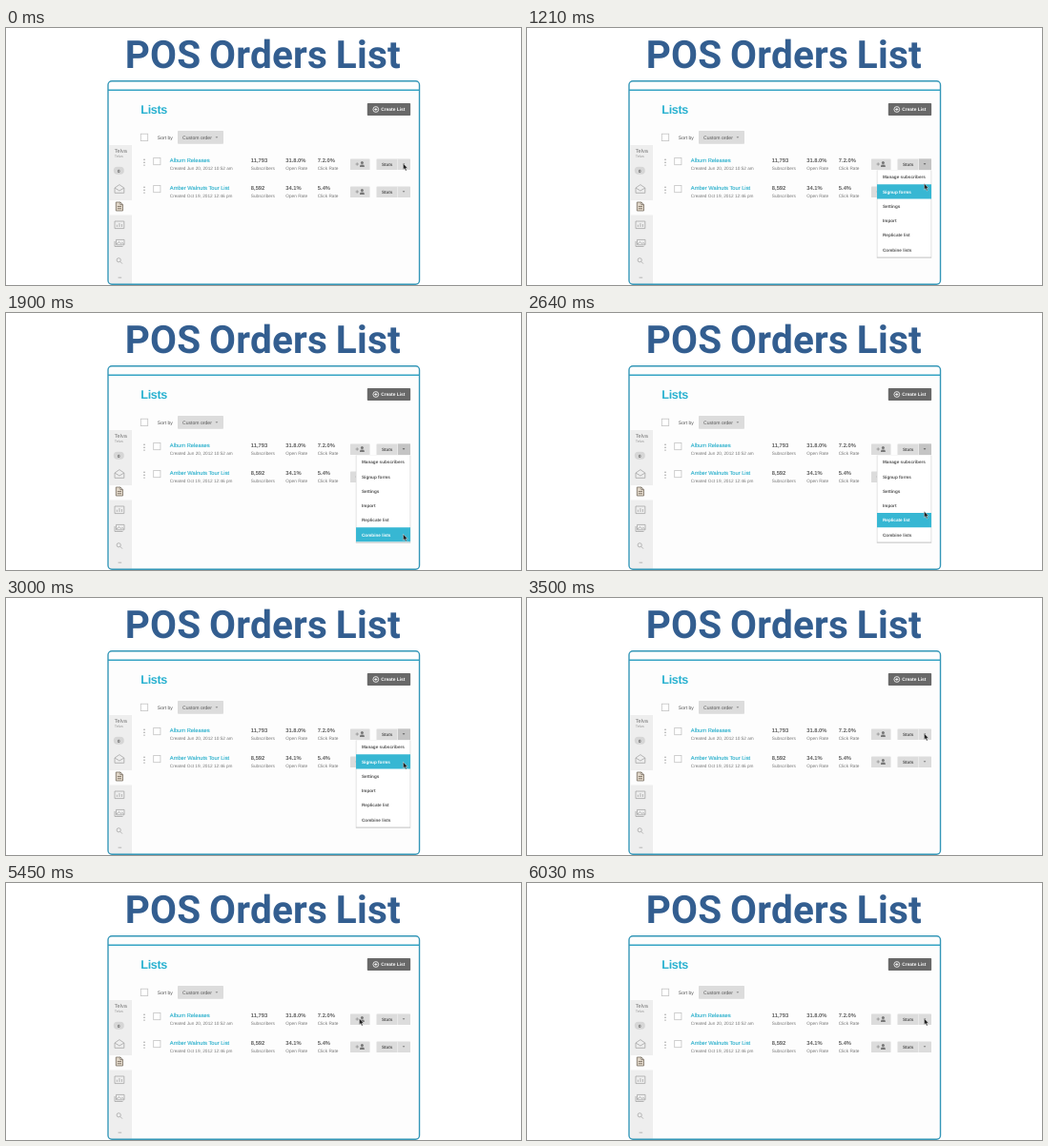
These frames come from a looping animation (540 px wide and 270 px high, 6.36 s). An HTML page:

```html
<!DOCTYPE html>
<html lang="en">
<head>
<meta charset="utf-8">
<title>POS Orders List</title>
<style>
  html, body { margin: 0; width: 100%; height: 100%; overflow: hidden; background: #fff; }
  svg { display: block; width: 100vw; height: 100vh; }
  text { font-family: "Liberation Sans", Arial, sans-serif; font-size: 4.75px; fill: #777; text-rendering: geometricPrecision; }
  .title { font: 700 40.5px Roboto, sans-serif; letter-spacing: .2px; word-spacing: -1.5px; fill: #335e90; text-anchor: middle; }
  .bold { font-weight: 700; fill: #555; }
  .link { font-size: 5.75px; fill: #2bb0cc; stroke: #2bb0cc; stroke-width: .12; }
  .number { font-size: 5.8px; font-weight: 700; fill: #606060; }
  .items text { font-size: 4.65px; font-weight: 700; fill: inherit; }
  .button { fill: #dcdcdc; }
  .box { fill: #fff; stroke: #c4c4c4; stroke-width: .8; }
  .icon { fill: none; stroke: #a6a6a6; stroke-width: .8; }

  /* One loop is 6360 ms; the small lead keeps steps ahead of their tick. */
  .menu, .form, .cursor, .hover { animation: 6360ms step-end -4ms infinite; }
  .menu { animation-name: menu; }
  .form { animation-name: form; }
  .cursor { animation-name: cursor; }
  .hover { animation-name: hover; }

  @keyframes menu {
    0%, 55.0314% { visibility: hidden; }
    11.0063% { visibility: visible; }
    100% { visibility: hidden; }
  }
  @keyframes form {
    0%, 85.6918% { visibility: hidden; }
    65.2516% { visibility: visible; }
    100% { visibility: hidden; }
  }
  @keyframes cursor {
    0% { transform: none; }
    15.7233% { transform: translate(0, 0); animation-timing-function: steps(30); }
    29.8742% { transform: translate(0, 90px); }
    37.7358% { transform: translate(0, 90px); animation-timing-function: steps(30); }
    51.8868% { transform: translate(0, 0); }
    57.2327% { transform: translate(0, 0); animation-timing-function: steps(16); }
    64.7799% { transform: translate(-46px, 0); }
    87.2642% { transform: translate(-46px, 0); animation-timing-function: steps(16); }
    94.8113%, 100% { transform: translate(0, 0); }
  }
  @keyframes hover {
    0% { transform: translateY(-15.25px); }
    14.3082% { transform: translateY(-15.25px); animation-timing-function: steps(6); }
    28.4591% { transform: translateY(76.25px); }
    37.2642% { transform: translateY(76.25px); animation-timing-function: steps(6); }
    51.4151%, 100% { transform: translateY(-15.25px); }
  }
</style>
</head>
<body>
<svg viewBox="0 0 540 270">
  <defs>
    <clipPath id="window"><rect x="107" y="55.8" width="326.5" height="213.5" rx="4"/></clipPath>
    <clipPath id="hoverRow"><rect class="hover" x="367" y="149" width="57" height="15.25"/></clipPath>
    <g id="rowTools">
      <g fill="#8c8c8c"><circle cx="145" cy="138.3" r=".7"/><circle cx="145" cy="141.2" r=".7"/><circle cx="145" cy="144.1" r=".7"/></g>
      <rect class="box" x="154.7" y="136.5" width="7.2" height="7.2"/>
      <rect class="button" x="361" y="137.5" width="20.5" height="11.5" rx=".6"/>
      <path d="M366.5 143h3.4M368.2 141.3v3.4" stroke="#888" stroke-width=".7"/>
      <path d="M371 146v-1q0-1.4 2.4-1.4t2.4 1.4v1z" fill="#777"/>
      <circle cx="373.4" cy="141.5" r="1.5" fill="#777"/>
      <rect class="button" x="388.5" y="137.5" width="35.5" height="11.5" rx=".6"/>
      <path d="M410.6 137.5v11.5" stroke="#f2f2f2" stroke-width=".7"/>
      <text class="bold" x="394" y="145" style="font-size:4.6px">Stats</text>
      <path d="M415.6 142.2h2.8l-1.4 1.6z" fill="#777"/>
      <text x="256.8" y="149.4">Subscribers</text>
      <text x="293.2" y="149.4">Open Rate</text>
      <text x="326.8" y="149.4">Click Rate</text>
    </g>
    <rect id="field" class="box" x="158.7" y="181.5" width="174.5" height="10.7"/>
    <g id="menuItems" class="items">
      <text x="373" y="158.4">Manage subscribers</text>
      <text x="373" y="173.7">Signup forms</text>
      <text x="373" y="188.9">Settings</text>
      <text x="373" y="204.2">Import</text>
      <text x="373" y="219.4">Replicate list</text>
      <text x="373" y="234.7">Combine lists</text>
    </g>
  </defs>

  <rect width="540" height="270" fill="#fff"/>
  <text class="title" x="269.3" y="42">POS Orders List</text>

  <g clip-path="url(#window)">
    <rect x="107" y="55" width="327" height="215" fill="#fdfdfd"/>
    <path d="M107 65.3h327" stroke="#35a3c4" stroke-width="1.4"/>

    <!-- sidebar -->
    <rect x="108.5" y="123" width="23.5" height="147" fill="#eee"/>
    <rect x="108.5" y="181" width="23.5" height="15.5" fill="#fdfdfd"/>
    <text x="113.8" y="131.4" style="font-size:5.6px">Telva</text>
    <text x="113.8" y="136.3" style="font-size:3.8px;fill:#999">Telva</text>
    <rect x="112.8" y="145.8" width="11" height="8" rx="4" fill="#d6d6d6"/>
    <text class="bold" x="117" y="151.5" style="font-size:4.6px">0</text>
    <g class="icon">
      <path d="M114 168v5.3h9.8V168l-4.9-3.4zM114 168l4.9 3 4.9-3"/>
      <path d="M115.3 183h4.6l2.6 2.6v6.4h-7.2zM119.9 183v2.6h2.6M116.8 187.5h4.2M116.8 189.7h4.2" fill="#e0d6c8" stroke="#776d60"/>
      <path d="M114 203h9.8v7.6H114zM116.4 209v-2.3M118.9 209v-4M121.4 209v-3"/>
      <path d="M115.5 222.4h8.5v5.4h-8.5zM114 224v5.5h8.5M116 227l2.5-2.3 2 1.8 1.4-1 2 1.8"/>
      <circle cx="118.2" cy="243.8" r="2.1"/>
      <path d="M119.8 245.4l2.1 2.2M117.6 262.2h3.6"/>
    </g>

    <!-- header -->
    <text x="141.3" y="90.4" style="font-size:12.6px;letter-spacing:-.35px;font-weight:700;fill:#29b1d0">Lists</text>
    <rect x="378.8" y="79" width="45.3" height="13" rx=".8" fill="#686868"/>
    <g fill="none" stroke="#fff" stroke-width=".8">
      <circle cx="387.8" cy="85.5" r="2.9"/><path d="M386.2 85.5h3.2M387.8 83.9v3.2"/>
    </g>
    <text class="bold" x="393.3" y="87.2" style="font-size:4.85px;fill:#fff">Create List</text>
    <rect class="box" x="141.3" y="111.2" width="7.4" height="7.4"/>
    <text x="158.8" y="116.8" style="font-size:5.05px;fill:#555">Sort by</text>
    <rect class="button" x="180" y="108" width="48" height="13.7" rx=".8"/>
    <text x="185" y="116.6" style="font-size:5.1px;fill:#555">Custom order</text>
    <path d="M219.5 114.2h2.8l-1.4 1.6z" fill="#888"/>

    <!-- list rows -->
    <use href="#rowTools"/>
    <text class="link" x="171.8" y="141.4">Album Releases</text>
    <text x="171.8" y="149.4" style="font-size:4.7px">Created Jun 20, 2012 10:52 am</text>
    <text class="number" x="256.8" y="141.4">11,793</text>
    <text class="number" x="293.2" y="141.4">31.8.0%</text>
    <text class="number" x="326.8" y="141.4">7.2.0%</text>

    <use href="#rowTools" y="29"/>
    <text class="link" x="171.8" y="170.4">Amber Walnuts Tour List</text>
    <text x="171.8" y="178.4" style="font-size:4.7px">Created Oct 19, 2012 12:46 pm</text>
    <text class="number" x="256.8" y="170.4">8,592</text>
    <text class="number" x="293.2" y="170.4">34.1%</text>
    <text class="number" x="326.8" y="170.4">5.4%</text>

    <g class="form">
      <rect x="134" y="155" width="300" height="115" fill="#fdfdfd"/>
      <text class="bold" x="158.5" y="166.6" style="font-size:8.3px;fill:#444">Add a subscriber</text>
      <text class="bold" x="158.5" y="177.2" style="font-size:4.6px">Email Address *</text>
      <use href="#field"/>
      <text class="bold" x="158.5" y="207.6" style="font-size:4.6px">First Name</text>
      <use href="#field" y="30.3"/>
      <text class="bold" x="158.5" y="238.2" style="font-size:4.6px">Last Name</text>
      <use href="#field" y="60.7"/>
      <rect class="box" x="158.8" y="263.5" width="7" height="7"/>
      <text class="bold" x="169.8" y="268.8" style="font-size:4.6px">This person gave me permission to be added to my list. <tspan fill="#2bb0cc" text-decoration="underline">What's this?</tspan></text>
    </g>

    <g class="menu">
      <rect x="411" y="137.5" width="13" height="11.5" fill="#c4c4c4"/>
      <path d="M415.6 142.2h2.8l-1.4 1.6z" fill="#555"/>
      <rect x="366.8" y="149.5" width="57.4" height="92.3" fill="#d0d0d0"/>
      <rect x="367.4" y="149.3" width="56.2" height="91.2" fill="#fff"/>
      <use href="#menuItems" fill="#555"/>
      <g clip-path="url(#hoverRow)">
        <rect x="367" y="149" width="57" height="91.5" fill="#37b7d3"/>
        <use href="#menuItems" fill="#fff"/>
      </g>
    </g>

    <g class="cursor">
      <path transform="translate(416.4 142.2)" d="M0 0V6.8L1.5 5.4 2.6 7.9 3.8 7.4 2.7 5H4.8Z" fill="#222" stroke="#fff" stroke-width=".4"/>
    </g>
  </g>

  <rect x="107" y="55.8" width="326.5" height="213.5" rx="4" fill="none" stroke="#3597b8" stroke-width="1.4"/>
</svg>
</body>
</html>
```
